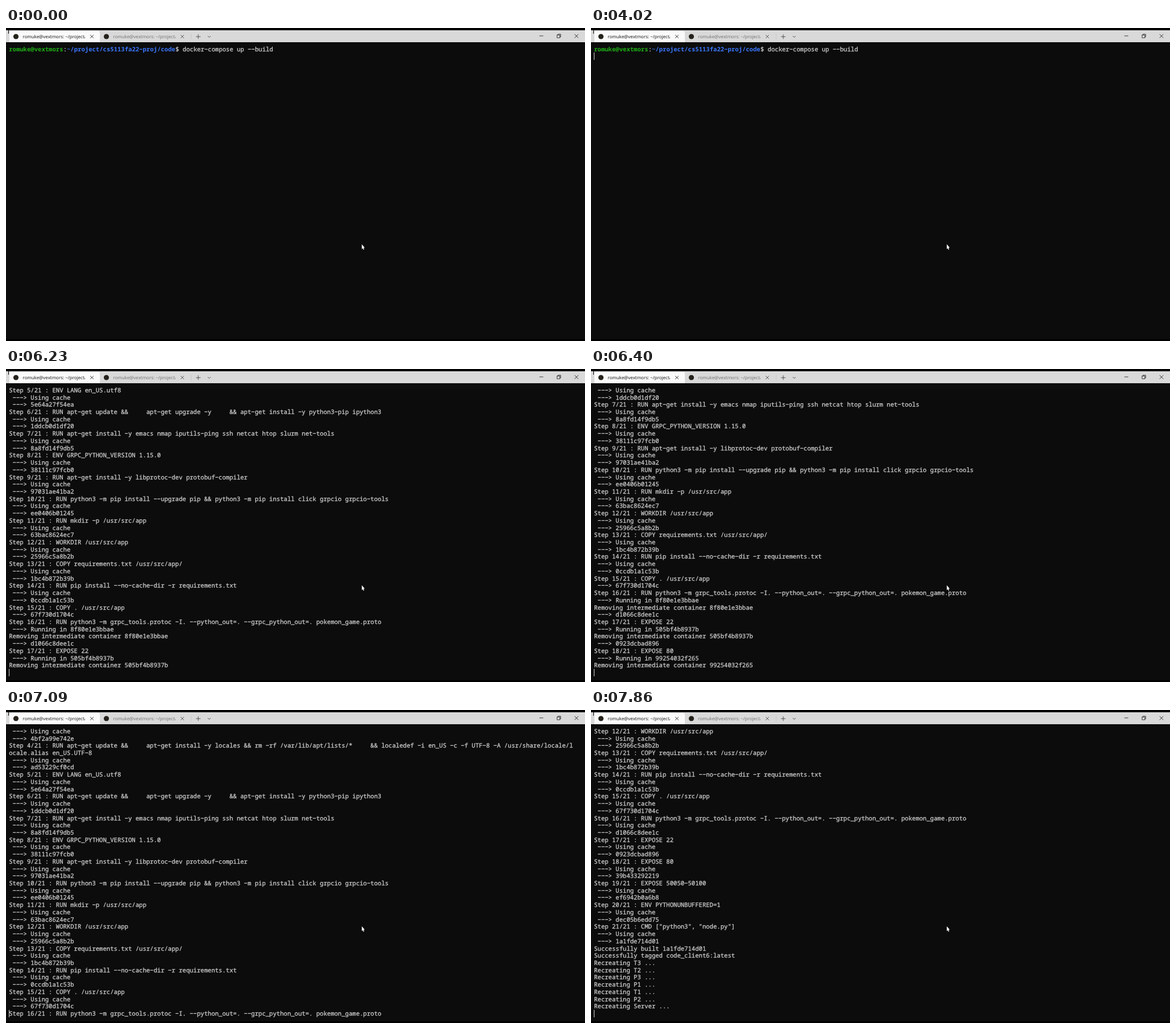
Recreate the animation shown at these times as an HTML page with a canvas. Size 1018 by 550 pixels, loop 8000 ms.

```html
<!DOCTYPE html>
<html lang="en">
<head>
<meta charset="utf-8">
<title>Terminal</title>
<style>
  html, body { margin: 0; width: 100%; height: 100%; overflow: hidden; background: #000; }
  canvas { display: block; width: 1018px; height: 550px; }
</style>
</head>
<body>
<canvas id="stage" width="1018" height="550"></canvas>
<script>
const ctx = document.getElementById('stage').getContext('2d');
const LOOP = 8000;
const CELL = 6.3625, ROW = 12.725, LEFT = 5.2, TOP = 30.7;
const MONO = '10.6px "Noto Sans Mono", "DejaVu Sans Mono", monospace';
const SANS = '8px "Open Sans", "Noto Sans", sans-serif';
const FG = '#cccccc', GREEN = '#1fb016', BLUE = '#3b78ff';
const USER = 'romuke@vextmors';
const COMMAND = 'docker-compose up --build';

// Build steps from 4 on: command, image id, container id
const steps = [
  ['RUN apt-get update &&     apt-get install -y locales && rm -rf /var/lib/apt/lists/*     && localedef -i en_US -c -f UTF-8 -A /usr/share/locale/locale.alias en_US.UTF-8', 'ad53229cf0cd'],
  ['ENV LANG en_US.utf8', '5e64a27f54ea'],
  ['RUN apt-get update &&     apt-get upgrade -y     && apt-get install -y python3-pip ipython3', '1ddcb0d1df20'],
  ['RUN apt-get install -y emacs nmap iputils-ping ssh netcat htop slurm net-tools', '8a8fd14f9db5'],
  ['ENV GRPC_PYTHON_VERSION 1.15.0', '38111c97fcb0'],
  ['RUN apt-get install -y libprotoc-dev protobuf-compiler', '97031ae41ba2'],
  ['RUN python3 -m pip install --upgrade pip && python3 -m pip install click grpcio grpcio-tools', 'ee0406b01245'],
  ['RUN mkdir -p /usr/src/app', '63bac8624ec7'],
  ['WORKDIR /usr/src/app', '25966c5a8b2b'],
  ['COPY requirements.txt /usr/src/app/', '1bc4b872b39b'],
  ['RUN pip install --no-cache-dir -r requirements.txt', '0ccdb1a1c53b'],
  ['COPY . /usr/src/app', '67f730d1704c'],
  ['RUN python3 -m grpc_tools.protoc -I. --python_out=. --grpc_python_out=. pokemon_game.proto', 'd1066c8dee1c', '8f80e1e3bbae'],
  ['EXPOSE 22', '0923dcbad896', '505bf4b8937b'],
  ['EXPOSE 80', '39b433292219', '99254032f265'],
  ['EXPOSE 50050-50100', 'ef6942b0a6b8', '3ad68a9e0a21'],
  ['ENV PYTHONUNBUFFERED=1', 'dec05b6edd75', '4c9f674eefa7'],
  ['CMD ["python3", "node.py"]', '1a1fde714d01', '8b1e8db14157']
];
const SENDING = 'Sending build context to Docker daemon  30.72kB';

const wrap = line => line.match(/.{1,156}/g);

function buildLog(name, cached, tail) {
  const log = [' ---> Using cache', ' ---> 4bf2a99e742e'];
  steps.forEach(([cmd, image, box], i) => {
    const n = i + 4;
    log.push(...wrap(`Step ${n}/21 : ${cmd}`));
    if (cached || n < 15) log.push(' ---> Using cache');
    else if (box) log.push(` ---> Running in ${box}`, `Removing intermediate container ${box}`);
    log.push(` ---> ${image}`);
  });
  return log.concat('Successfully built 1a1fde714d01', `Successfully tagged code_${name}:latest`, tail);
}

const server = buildLog('server', false, ['Building client1', SENDING]);
const client = buildLog('client6', true,
  ['T3', 'T2', 'P3', 'P1', 'T1', 'P2', 'Server'].map(s => `Recreating ${s} ...`));
const intro = ['', 'Building server', SENDING];

// Each view: start time, log, first line, line count, cursor [column, row]
const END = [0, 39];
const views = [
  [0, intro, 0, 1, null],
  [420, intro, 0, 1, [73, 0]],
  [4020, intro, 0, 1, [0, 1]],
  [4740, intro, 0, 3, [0, 3]],
  [4910, server, 0, 39, END],
  [5080, server, 1, 39, END],
  [6230, server, 6, 39, END],
  [6400, server, 10, 39, END],
  [6680, server, 16, 40, END],
  [6830, server, 27, 39, END],
  [7090, client, 0, 40, END],
  [7310, client, 1, 40, END],
  [7480, client, 2, 40, END],
  [7700, client, 20, 39, END],
  [7860, client, 27, 39, END]
];

function rect(color, x, y, w, h) {
  ctx.fillStyle = color;
  ctx.fillRect(x, y, w, h);
}

function stroke(color, width, ...lines) {
  ctx.strokeStyle = color;
  ctx.lineWidth = width;
  ctx.beginPath();
  for (const line of lines) line.forEach(([x, y], i) => i ? ctx.lineTo(x, y) : ctx.moveTo(x, y));
  ctx.stroke();
}

function cross(x, y, r, color) {
  stroke(color, 0.8, [[x - r, y - r], [x + r, y + r]], [[x - r, y + r], [x + r, y - r]]);
}

// The terminal face is sturdy, with wide hyphens at the height of a minus
function print(text, col, row, color = FG, weight = '') {
  const line = text.replace(/-/g, '\u2212');
  const x = LEFT + col * CELL, y = TOP + row * ROW + 10.1;
  ctx.font = `${weight} ${MONO}`;
  ctx.fillStyle = ctx.strokeStyle = color;
  ctx.fillText(line, x, y);
  if (!weight) {
    ctx.lineWidth = 0.3;
    ctx.strokeText(line, x, y);
  }
}

function prompt() {
  print(USER, 0, 0, GREEN, 'bold');
  print(':', 15, 0);
  print('~/project/cs5113fa22-proj/code', 16, 0, BLUE, 'bold');
  print('$ ' + COMMAND, 46, 0);
}

function tab(x, color) {
  ctx.fillStyle = '#25221c';
  ctx.beginPath();
  ctx.arc(x + 11.5, 15, 4.6, 0, Math.PI * 2);
  ctx.fill();
  ctx.save();
  ctx.beginPath();
  ctx.rect(x + 22, 6, 111, 18);
  ctx.clip();
  ctx.font = SANS;
  ctx.fillStyle = color;
  ctx.fillText(USER + ': ~/project/cs5113fa22-proj/code', x + 23.3, 18);
  ctx.restore();
  cross(x + 145, 15, 3, color === '#111' ? '#222' : '#444');
}

function titleBar() {
  rect('#d9d9d9', 0, 4, 1018, 21);
  rect('#000', 4, 4, 1, 6);
  ctx.fillStyle = '#fafafa';
  ctx.beginPath();
  ctx.roundRect(6, 5, 159, 20, [4, 4, 0, 0]);
  ctx.fill();
  tab(6, '#111');
  tab(165, '#707070');
  stroke('#bcbcbc', 0.6, [[325.5, 10], [325.5, 20]]);
  stroke('#333', 0.8, [[334, 15.2], [342, 15.2]], [[338, 11.2], [338, 19.2]]);
  stroke('#444', 0.9, [[354.8, 14], [357.3, 16.5], [359.8, 14]]);
  stroke('#111', 0.8, [[937.8, 13.9], [944.6, 13.9]]);
  stroke('#111', 0.8, [[968.9, 12.3], [973.8, 12.3], [973.8, 17.2], [968.9, 17.2], [968.9, 12]],
    [[970.4, 12.3], [970.4, 10.9], [975.2, 10.9], [975.2, 15.7], [973.8, 15.7]]);
  cross(1003, 14.2, 3.3, '#111');
}

function pointer() {
  const shape = [[0, 0], [0, 9], [2, 7.3], [3.4, 10.2], [4.9, 9.5], [3.6, 6.7], [6.2, 6.5]];
  ctx.beginPath();
  shape.forEach(([x, y]) => ctx.lineTo(625.6 + x * 0.85, 380 + y * 0.95));
  ctx.closePath();
  ctx.strokeStyle = '#000';
  ctx.lineWidth = 0.8;
  ctx.stroke();
  ctx.fillStyle = '#fff';
  ctx.fill();
}

function draw([, log, first, count, cursor]) {
  ctx.textRendering = 'geometricPrecision';
  ctx.lineJoin = 'round';
  rect('#000', 0, 0, 1018, 550);
  titleBar();
  rect('#0c0c0c', 0, 25, 1018, 522);
  if (log === intro) prompt();
  log.slice(first, first + count).forEach((line, row) => print(line, 0, row));
  if (cursor) {
    const [col, row] = cursor;
    rect('#d0d0d0', Math.round(LEFT + col * CELL), Math.round(TOP + row * ROW), 1, 13);
  }
  pointer();
}

let shown = null;
function tick(now) {
  const t = now % LOOP;
  const view = views.findLast(v => v[0] <= t);
  if (view !== shown) draw(shown = view);
  requestAnimationFrame(tick);
}
draw(shown = views[0]);
requestAnimationFrame(tick);
</script>
</body>
</html>
```
